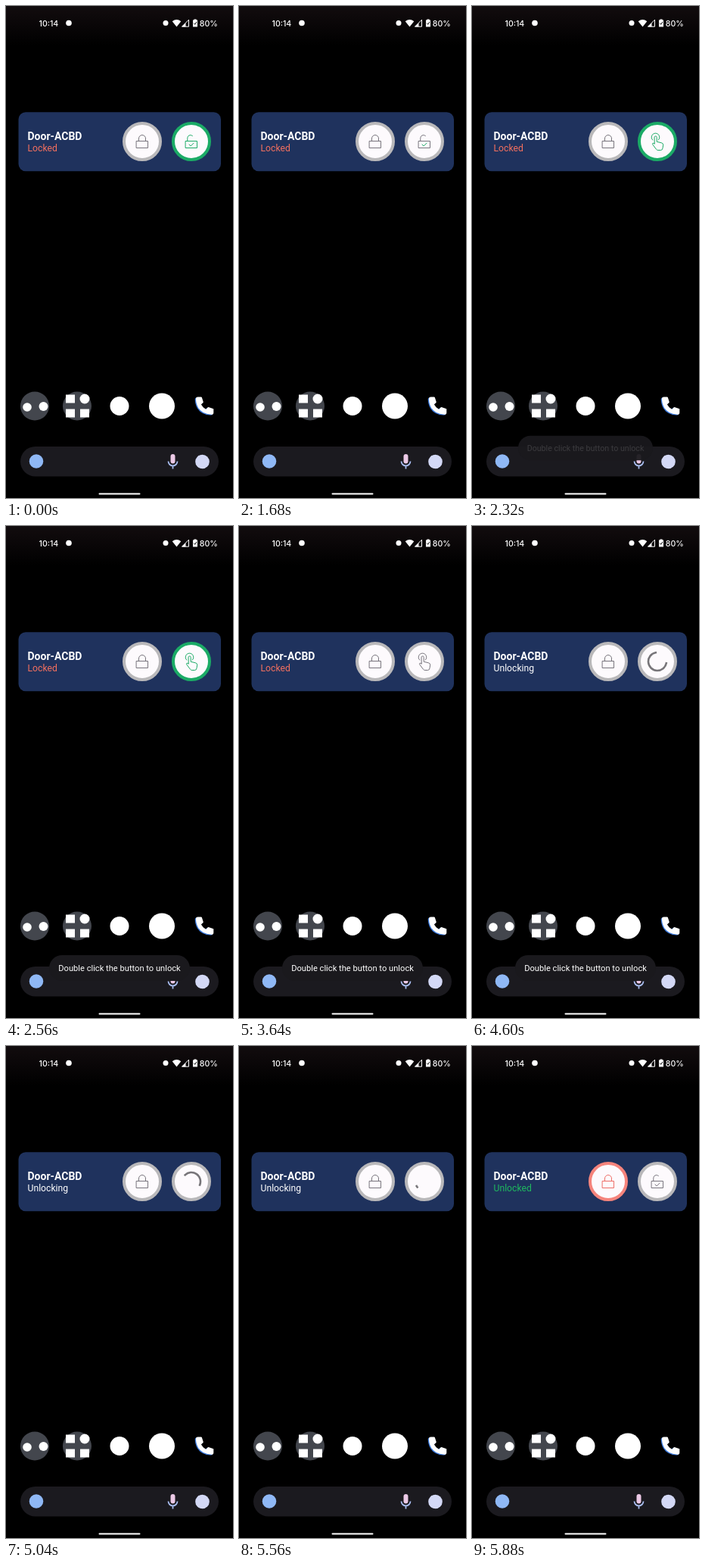
Recreate the animation shown at these times as an HTML page. Size 300 px wide and 650 px high, loop 5920 ms.

```html
<!DOCTYPE html>
<html lang="en">
<head>
<meta charset="utf-8">
<title>Lock widget</title>
<style>
  html, body { margin: 0; height: 100%; overflow: hidden; background: #000; }
  svg { display: block; width: 100%; height: 100%; }
  text { font-family: Roboto, sans-serif; fill: #fff; }
  .bar { font: 500 10.6px Inter, sans-serif; }
  .line { fill: none; stroke-width: 1; stroke-linecap: round; stroke-linejoin: round; }
  .ring { fill: #fdfafd; stroke-width: 4; }
</style>
</head>
<body>
<svg viewBox="0 0 300 650">
  <defs>
    <linearGradient id="shade" x2="0" y2="1">
      <stop stop-color="#120c0e"/><stop offset="1" stop-color="#000"/>
    </linearGradient>
    <path id="handset" stroke-width="1.4" stroke-linejoin="round"
      d="M5 3.7h3.4l1.5 4.6-2.5 2.3q2 4 6 6l2.3-2.5 4.6 1.5v3.4q0 1.3-1.6 1.3Q4.700 19.300 3.700 5.300q0-1.600 1.300-1.600z"/>
  </defs>
  <rect width="300" height="52" fill="url(#shade)"/>

  <g fill="#fff">
    <text class="bar" x="43.500" y="26.700">10:14</text>
    <circle cx="83" cy="22.500" r="3.800"/>
    <circle cx="211" cy="22.500" r="3.500"/>
    <path d="M219.700 20.300q5.800-4.600 11.600 0l-5.800 7.200z"/>
    <path d="M232.500 27.200l9-9v9z" fill="none" stroke="#fff"/>
    <path d="M232.500 27.200h5v-5z"/>
    <path d="M248.500 18.500v-1h3v1h1.500v9h-6v-9z"/>
    <path d="M248.500 23l1.200 1.300 2-3" class="line" stroke="#000"/>
    <text class="bar" x="255.800" y="26.700">80%</text>
  </g>

  <rect x="16.500" y="140.300" width="267.500" height="78" rx="9.500" fill="#1f325d"/>
  <text x="28.500" y="177" font-size="14" font-weight="700">Door-ACBD</text>
  <text id="status" x="28.500" y="191.500" font-size="12.200"></text>

  <circle id="lockRing" class="ring" cx="180" cy="179" r="24"/>
  <path id="lockIcon" class="line" d="M172.500 178.500h15v9h-15zM175.500 178.500v-3.500a4.500 4.500 0 0 1 9 0v3.500"/>

  <circle id="openRing" class="ring" cx="245" cy="179" r="24"/>
  <g id="openIcon" class="line">
    <path d="M237.500 178.500h15v9h-15zM239.800 178.500v-4a4 4 0 0 1 6.600-3"/>
    <path id="tick" d="M242 183l2.200 2 4-4"/>
  </g>
  <path id="hand" class="line" d="M238.600 177a5.300 5.300 0 1 1 7.800 0M241 173.500a1.600 1.600 0 0 1 3.200 0v5.800l6.300 1.500q2.400.6 2.200 3l-.7 4q-.3 2.700-2.500 2.700h-3.600q-1.500 0-2.500-1.300l-4.800-6.500q-.4-1.700 1.400-1.500l1 .8z"/>
  <path id="arc" fill="none" stroke="#777579" stroke-width="2.600" stroke-linecap="square"/>

  <g fill="#fff">
    <g fill="#43464d"><circle cx="38" cy="528.500" r="19"/><circle cx="94" cy="528.500" r="19"/></g>
    <circle cx="28" cy="530" r="5.800"/>
    <circle cx="49.500" cy="529" r="6"/>
    <rect x="79" y="513.500" width="12" height="11"/>
    <circle cx="104" cy="519" r="6.500"/>
    <rect x="79" y="532.500" width="12" height="11"/>
    <rect x="98" y="532.500" width="12" height="11"/>
    <circle cx="150" cy="528.500" r="12.500"/>
    <circle cx="206" cy="528.500" r="17"/>
    <use href="#handset" transform="translate(245.800 513.300) scale(1.300)" fill="#3f7de0" stroke="#3f7de0"/>
    <use href="#handset" transform="translate(247 512.500) scale(1.300)" stroke="#fff"/>
  </g>

  <rect x="19" y="582" width="262" height="39.500" rx="19.750" fill="#1b1a1f"/>
  <circle cx="40" cy="601.500" r="9.300" fill="#8fb8f5"/>
  <rect x="217.500" y="592" width="6" height="12.500" rx="3" fill="#ecc9e6"/>
  <path d="M214.500 601.500a6 6 0 0 0 12 0M220.500 608v3.500" fill="none" stroke="#a9bdf0" stroke-width="1.800"/>
  <circle cx="259.500" cy="602" r="9.300" fill="#d3d8f5"/>
  <rect x="122.500" y="643.500" width="55" height="2" rx="1" fill="#fff"/>

  <g id="toast">
    <rect id="toastBox" x="57" y="567" width="186" height="34" rx="17" fill="#1a191d"/>
    <text id="toastText" x="150" y="588" font-size="11.150" text-anchor="middle">Double click the button to unlock</text>
  </g>
</svg>
<script>
const LOOP = 5920, STEP = 40;
const CLICK = 1680, ASK = 2240, CONFIRM = 3640, SPIN = 4160, HIDE = 4640, DONE = 5880;
const GREY = '#b9b8ba', INK = '#77747c', GREEN = '#1bab66', RED = '#f5847c';

const $ = id => document.getElementById(id);
const set = (id, attrs) => { for (const k in attrs) $(id).setAttribute(k, attrs[k]); };
const show = (id, on) => set(id, { visibility: on ? 'visible' : 'hidden' });
const clamp = v => Math.max(0, Math.min(1, v));
const smooth = k => k * k * (3 - 2 * k);

// Height of a cubic curve from (x0,0) to (x1,1) at x, with control points (a,0) and (b,1)
function curve(x, x0, a, b, x1) {
  if (x <= x0) return 0;
  if (x >= x1) return 1;
  let lo = 0, hi = 1;
  for (let i = 0; i < 24; i++) {
    const s = (lo + hi) / 2, r = 1 - s;
    const at = r * r * r * x0 + 3 * r * r * s * a + 3 * r * s * s * b + s * s * s * x1;
    if (at < x) lo = s; else hi = s;
  }
  return smooth(lo);
}

// Indeterminate spinner: the head runs ahead, then the tail catches up
function spinner(ms) {
  const p = ms % 1333 / 1333;
  const turn = p * .25 + ms / 4444 * 2;
  const tail = turn + .75 * curve(p, .5, .7, .6, 1);
  const head = turn + .75 * curve(p, 0, .2, .1, .5) + .002;
  const point = v => {
    const a = v * 2 * Math.PI;
    return `${245 + 12 * Math.sin(a)} ${179 - 12 * Math.cos(a)}`;
  };
  return `M${point(tail)}A12 12 0 ${head - tail > .5 ? 1 : 0} 1 ${point(head)}`;
}

function toast(t) {
  const k = t < HIDE ? clamp((t - ASK) / 340) : clamp(1 - (t - HIDE) / 240);
  const size = .95 + .05 * smooth(k);
  set('toast', { transform: `translate(150 584) scale(${size}) translate(-150 -584)` });
  set('toastBox', { opacity: clamp(k * 4) });
  set('toastText', { opacity: smooth(k) });
}

function draw(t) {
  const done = t >= DONE, spinning = t >= SPIN && !done;
  const ready = t < CLICK || (t >= ASK && t < CONFIRM);
  const asking = t >= ASK && t < SPIN;
  const ink = ready ? GREEN : INK;

  $('status').textContent = done ? 'Unlocked' : spinning ? 'Unlocking' : 'Locked';
  $('status').style.fill = done ? '#1fb85f' : spinning ? '#fff' : '#f4705f';

  set('lockRing', { stroke: done ? RED : GREY });
  set('lockIcon', { stroke: done ? '#ee6f68' : INK });
  set('openRing', { stroke: ready ? GREEN : GREY });
  set('openIcon', { stroke: ink });
  set('tick', { stroke: done ? INK : GREEN });
  set('hand', { stroke: ink });
  show('openIcon', t < ASK || done);
  show('hand', asking);
  show('arc', spinning);
  if (spinning) set('arc', { d: spinner(t - SPIN) });
  toast(t);
}

const start = performance.now();
function tick() {
  const t = (performance.now() - start) % LOOP;
  draw(Math.floor(t / STEP) * STEP);
  requestAnimationFrame(tick);
}
tick();
</script>
</body>
</html>
```
